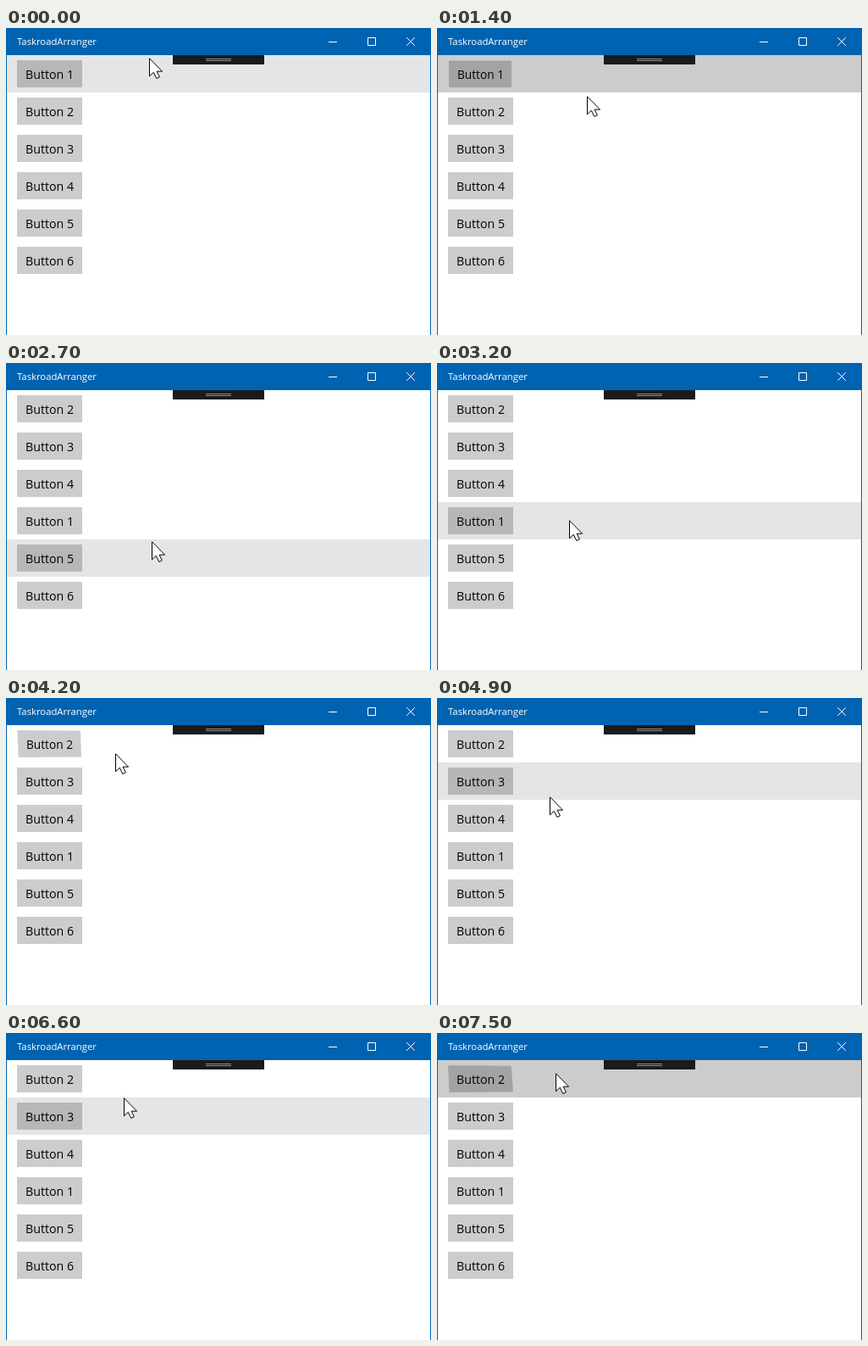
These frames come from a looping animation (502x362 px, 7.6 s). An HTML page:

```html
<!DOCTYPE html>
<html lang="en">
<head>
<meta charset="utf-8">
<title>Reorder list</title>
<style>
html, body { margin: 0; width: 100%; height: 100%; overflow: hidden; background: #fff; }
svg { display: block; }
text { font-family: "Open Sans", "Noto Sans", sans-serif; }
.label { font-size: 14.2px; }
</style>
</head>
<body>
<svg id="stage" width="502" height="362" viewBox="0 0 502 362">
  <rect width="502" height="362" fill="#fff"/>
  <g id="rows"></g>
  <rect x="197" y="32" width="108" height="11" fill="#1b1b1b"/>
  <path d="M236 36.5h30M236 38.5h30" stroke="#8c8c8c"/>
  <path d="M0 0H502V362H501V32H1V362H0Z" fill="#0063b1"/>
  <text x="13" y="20" font-size="11.3" fill="#fff">TaskroadArranger</text>
  <path d="M381 16.5h10M427.5 11.5h9v9h-9zM473.2 11.2l9.6 9.6M482.8 11.2l-9.6 9.6" fill="none" stroke="#fff"/>
  <path id="cursor" d="M.5 .8V21.8L5.3 17.3 8.8 24.5 12.4 22.8 9.1 16.2H15.6Z" fill="#fff" stroke="#000"/>
</svg>
<script>
const LOOP = 7600, STEP = 100, TOP = 32, ROW = 44;

// Pointer path: time, x, y
const PATH = [
  [0, 169, 35], [200, 179, 48], [400, 186, 60], [500, 183, 56], [1300, 183, 56],
  [1400, 177, 80], [2000, 174, 206], [2100, 172, 210], [2800, 172, 210],
  [3200, 156, 185], [3600, 123, 46], [3700, 125, 53], [4100, 125, 53],
  [4200, 129, 65], [4600, 134, 149], [4700, 134, 149], [5300, 132, 50],
  [5400, 132, 50], [5500, 133, 58], [5600, 133, 58], [5900, 136, 108],
  [6100, 139, 148], [6400, 139, 148], [6700, 139, 40], [7400, 139, 40], [7500, 140, 47]
];

// Presses on the top row: start, highlight end, release, button corners, label scale
const FLAT = "13,6 90,6 90,38 13,38";
const PRESSES = [
  [1000, 1500, 1500, "14,6.5 88,6.5 88,38 14,38", 0.965],
  [4000, 4200, 4800, "13.3,6 88,6.5 89,37.5 14.7,38", 0.965],
  [5500, 5700, 6500, "14,6 88.5,6.5 88.5,38 14,38", 0.965],
  [7300, 7600, 7600, "13,6.3 87.8,6.8 90,37.5 14.5,38", 1]
];
const DRAG = 1500, SHIFT = 2000, DROP = 2700, GRIP = 24;

const clamp = v => Math.max(0, Math.min(1, v));
const easeOut = v => 1 - (1 - clamp(v)) ** 3;

function add(parent, tag, attrs) {
  const el = document.createElementNS("http://www.w3.org/2000/svg", tag);
  for (const key in attrs) el.setAttribute(key, attrs[key]);
  return parent.appendChild(el);
}

const list = document.getElementById("rows");
const cursor = document.getElementById("cursor");
const rows = [2, 3, 4, 5, 6, 1].map(id => {
  const g = add(list, "g", {});
  const glow = add(g, "rect", { x: 1, width: 500, height: ROW });
  const face = add(g, "polygon", { fill: "#000", "fill-opacity": 0.2 });
  const label = add(g, "text", { class: "label", x: 23, y: 28 });
  label.textContent = "Button " + id;
  return { id, g, glow, face, label };
});

function pointer(t) {
  const i = PATH.findIndex(p => p[0] > t);
  if (i < 0) return PATH[PATH.length - 1].slice(1);
  const [t0, x0, y0] = PATH[i - 1], [t1, x1, y1] = PATH[i];
  const k = (t - t0) / (t1 - t0);
  return [Math.round(x0 + (x1 - x0) * k), Math.round(y0 + (y1 - y0) * k)];
}

// Slot of a button in the list, moving up while the gap opens
function slot(id, t) {
  if (id > 4) return id - 1;
  if (id === 1) return t < DROP ? 0 : 3;
  return id - 1 - easeOut((t - SHIFT) / 350);
}

function draw(t) {
  const [x, y] = pointer(t);
  const dragging = t >= DRAG && t < DROP;
  const press = PRESSES.find(p => t >= p[0] && t < p[2]);
  const active = press && t < press[1];
  let hover = Math.floor((y - TOP) / ROW);
  if (active) hover = 0;
  else if (dragging || (press && hover === 0)) hover = -1;

  const away = dragging ? easeOut((t - DRAG + STEP) / 300) : 0;
  for (const { id, g, glow, face, label } of rows) {
    const held = dragging && id === 1;
    const pos = slot(id, t);
    const top = held ? y - GRIP : TOP + pos * ROW;
    const scale = held ? 1 : 1 - 0.05 * away;
    const tilt = press && pos === 0;
    g.setAttribute("transform", `translate(251 ${top + 22}) scale(${scale}) translate(-251 -22)`);
    g.setAttribute("opacity", held ? 1 : 1 - 0.5 * away);
    glow.setAttribute("fill-opacity", held ? 0.2 : pos === hover ? (active ? 0.2 : 0.1) : 0);
    face.setAttribute("points", tilt ? press[3] : FLAT);
    label.setAttribute("transform", tilt ? `translate(51 22) scale(${press[4]}) translate(-51 -22)` : "");
  }
  cursor.setAttribute("transform", `translate(${x} ${y})`);
}

const start = performance.now();
function tick() {
  const t = (performance.now() - start) % LOOP;
  draw(Math.floor(t / STEP) * STEP);
  requestAnimationFrame(tick);
}
tick();
</script>
</body>
</html>
```
